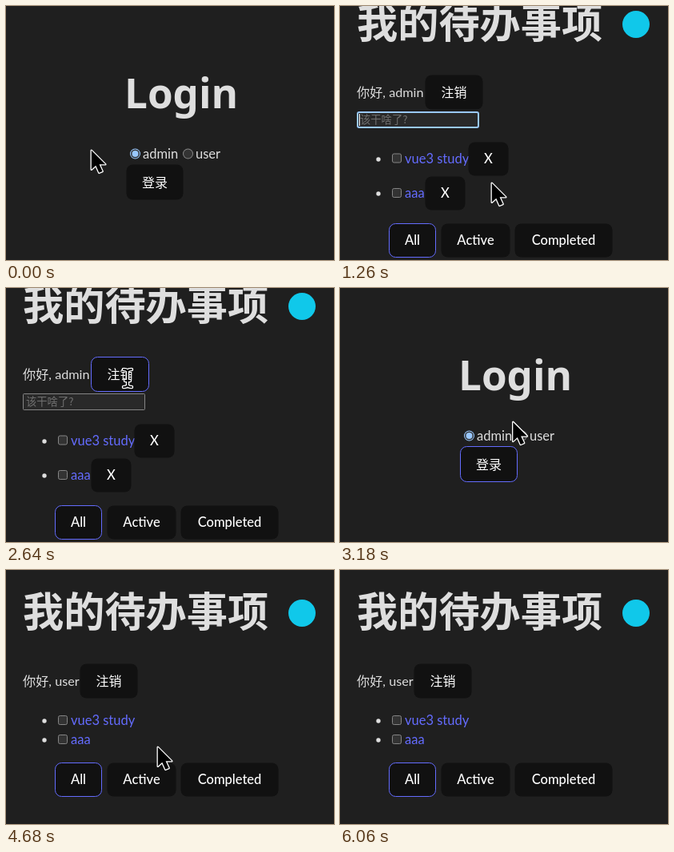
An HTML page with a canvas that plays this animation: 410x318 px, repeating every 6120 ms.

```html
<!DOCTYPE html>
<html lang="zh">
<head>
<meta charset="utf-8">
<title>Todo</title>
<style>
html, body { margin: 0; width: 100%; height: 100%; overflow: hidden; background: #1f1f1f; }
canvas { display: block; width: 410px; height: 318px; }
</style>
</head>
<body>
<canvas id="stage" width="410" height="318"></canvas>
<script>
const ctx = document.getElementById('stage').getContext('2d');
const LOOP = 6120, STEP = 60;
const SANS = 'Lato, "Noto Sans CJK SC", "Noto Sans CJK", sans-serif';
const CJK = '"Noto Sans CJK SC", "Noto Sans CJK", sans-serif';
const BG = '#1f1f1f', INK = '#dedede', LINK = '#646cff', BLUE = '#99c8ff';

// cursor hot spot: time, x, y
const PATH = [
  [0, 106, 180], [660, 192, 221], [840, 192, 221], [960, 189, 221],
  [1380, 189, 221], [1980, 157, 137], [2520, 152, 113], [2760, 152, 113],
  [3360, 233, 182], [3600, 233, 182], [3840, 210, 214], [4140, 191, 221],
  [4320, 189, 221], [4980, 189, 221], [5520, 164, 234], [6000, 116, 322]
];

const clamp = v => Math.max(0, Math.min(1, v));

function cursorAt(t) {
  let i = 0;
  while (i < PATH.length - 2 && t >= PATH[i + 1][0]) i++;
  const [t0, x0, y0] = PATH[i], [t1, x1, y1] = PATH[i + 1];
  const p = clamp((t - t0) / (t1 - t0)), e = p * p * (3 - 2 * p);
  return [x0 + (x1 - x0) * e, y0 + (y1 - y0) * e];
}

// border fades in while hovered, then out again
const hover = (t, from, to) => clamp((t - from) / 250) * clamp(1 - (t - to) / 250);

function text(s, x, y, font, color = INK, align = 'left') {
  ctx.font = font;
  ctx.fillStyle = color;
  ctx.textAlign = align;
  ctx.fillText(s, x, y);
}

function box(x, y, w, h, r, fill, stroke, line = 1) {
  ctx.beginPath();
  ctx.roundRect(x, y, w, h, r);
  ctx.fillStyle = fill;
  ctx.fill();
  if (!stroke) return;
  ctx.strokeStyle = stroke;
  ctx.lineWidth = line;
  ctx.stroke();
}

function dot(x, y, r, fill) {
  ctx.beginPath();
  ctx.arc(x, y, r, 0, Math.PI * 2);
  ctx.fillStyle = fill;
  ctx.fill();
}

function button(label, x, y, w, h, glow = 0) {
  box(x + .5, y + .5, w - 1, h - 1, 8, '#111', glow && `rgba(100,108,255,${glow})`);
  const latin = label.charCodeAt(0) < 128;
  text(label, x + w / 2, y + h / 2 + (latin ? 5.5 : 6), latin ? '500 16.5px ' + SANS : '500 16px ' + CJK, '#fff', 'center');
}

function radio(x, on) {
  dot(x, 185, 6.5, on ? BLUE : '#858585');
  dot(x, 185, 5.5, '#333');
  if (on) dot(x, 185, 4, BLUE);
}

function login(t) {
  const user = t >= 3420;
  text('Login', 148, 128, '600 51.2px "Noto Sans", sans-serif');
  radio(161.5, !user);
  radio(227.5, user);
  text('admin', 171, 191, '16.5px ' + SANS);
  text('user', 237, 191, '16.5px ' + SANS);
  button('登录', 150, 198, 72, 45, user ? hover(t, 3730, 9000) : hover(t, 420, 9000));
}

function item(label, y, bullet) {
  dot(48, bullet, 2.7, INK);
  box(65.5, y - 11.5, 11, 11, 2, '#333', '#858585');
  text(label, 81, y, '16.5px ' + SANS, LINK);
}

function input(t) {
  const focus = t < 2580;
  if (focus) box(22, 133, 151, 19, 2, '#292929', BLUE, 2);
  else box(21.5, 132.5, 152, 20, 1, '#292929', '#858585');
  text('该干啥了?', 25, 147, '13.3px ' + CJK, '#707070');
  if (focus && (t - 840) % 1000 < 500) {
    ctx.fillStyle = '#fff';
    ctx.fillRect(24, 135, 1, 15);
  }
}

function todos(t) {
  const admin = t < 2760;
  const top = admin ? -31 : 0;
  text('我的待办事项', 21, 71 + top, 'bold 51.2px ' + CJK);
  dot(370, 54 + top, 17, '#10c8ea');
  text('你好, ' + (admin ? 'admin' : 'user'), 21, 145 + top, '16.2px ' + SANS);
  button('注销', admin ? 106 : 92, 117 + top, 73, 44, admin ? hover(t, 2220, 9000) : 0);
  if (admin) {
    input(t);
    item('vue3 study', 196.5, 192);
    item('aaa', 240, 235);
    button('X', 160, 170, 51, 43);
    button('X', 106, 213, 51, 43);
  } else {
    item('vue3 study', 194, 189);
    item('aaa', 218, 213);
  }
  const y = admin ? 272 : 241;
  button('All', 61, y, 59, 43, 1);
  button('Active', 126, y, 87, 43, hover(t, 5600, 5800));
  button('Completed', 218, y, 123, 43);
}

const ARROW = new Path2D('M0 0V24L5.5 19L9.5 28L13.8 26.2L9.8 17.5H17.5Z');
const BEAM = new Path2D('M-5 -11Q-1 -11 0 -9Q1 -11 5 -11M-5 11Q-1 11 0 9Q1 11 5 11M0 -9V9M-3 3H3');
const HAND = new Path2D('M-2 1.5Q0 -1.5 2.2 1.5L5 9Q7 6.5 9 9Q11.3 7 13 9.8Q15.5 9 16 12L16.5 17Q16.5 20 14.8 22V25H4.5V22.5Q1 20 -5.5 13.5Q-7 10.5 -3.5 11L1 13.5Z');
const KNUCKLES = new Path2D('M6.5 15V21M9.5 15V21M12.5 15V21');

function outline(path, color, width) {
  ctx.strokeStyle = color;
  ctx.lineWidth = width;
  ctx.stroke(path);
}

function shapeAt(t, x, y) {
  if (t < 840) return x > 150 && y > 198 ? 'hand' : 'arrow';
  if (t < 2820) return y < 153 ? 'beam' : 'arrow';
  if (t < 4320) return x < 222 && y > 198 ? 'hand' : 'arrow';
  return y > 241 && y < 284 && x > 126 ? 'hand' : 'arrow';
}

function cursor(t) {
  const [x, y] = cursorAt(t);
  const shape = shapeAt(t, x, y);
  ctx.save();
  ctx.translate(x, y);
  ctx.lineJoin = ctx.lineCap = 'round';
  if (shape === 'arrow') {
    ctx.translate(.8, .8);
    outline(ARROW, '#fff', 2.6);
    ctx.fillStyle = '#000';
    ctx.fill(ARROW);
  } else if (shape === 'beam') {
    outline(BEAM, '#fff', 4.5);
    outline(BEAM, '#000', 1.8);
  } else {
    outline(HAND, '#000', 3);
    ctx.fillStyle = '#fff';
    ctx.fill(HAND);
    outline(KNUCKLES, '#000', 1.2);
  }
  ctx.restore();
}

function draw(now) {
  const t = Math.floor(now % LOOP / STEP) * STEP;
  ctx.fillStyle = BG;
  ctx.fillRect(0, 0, 410, 318);
  const inside = t >= 840 && t < 2760 || t >= 4260;
  (inside ? todos : login)(t);
  if (t < 6000) cursor(t);
}

let start;
function tick(now) {
  start ??= now;
  draw(now - start);
  requestAnimationFrame(tick);
}
draw(0);
requestAnimationFrame(tick);
</script>
</body>
</html>
```
